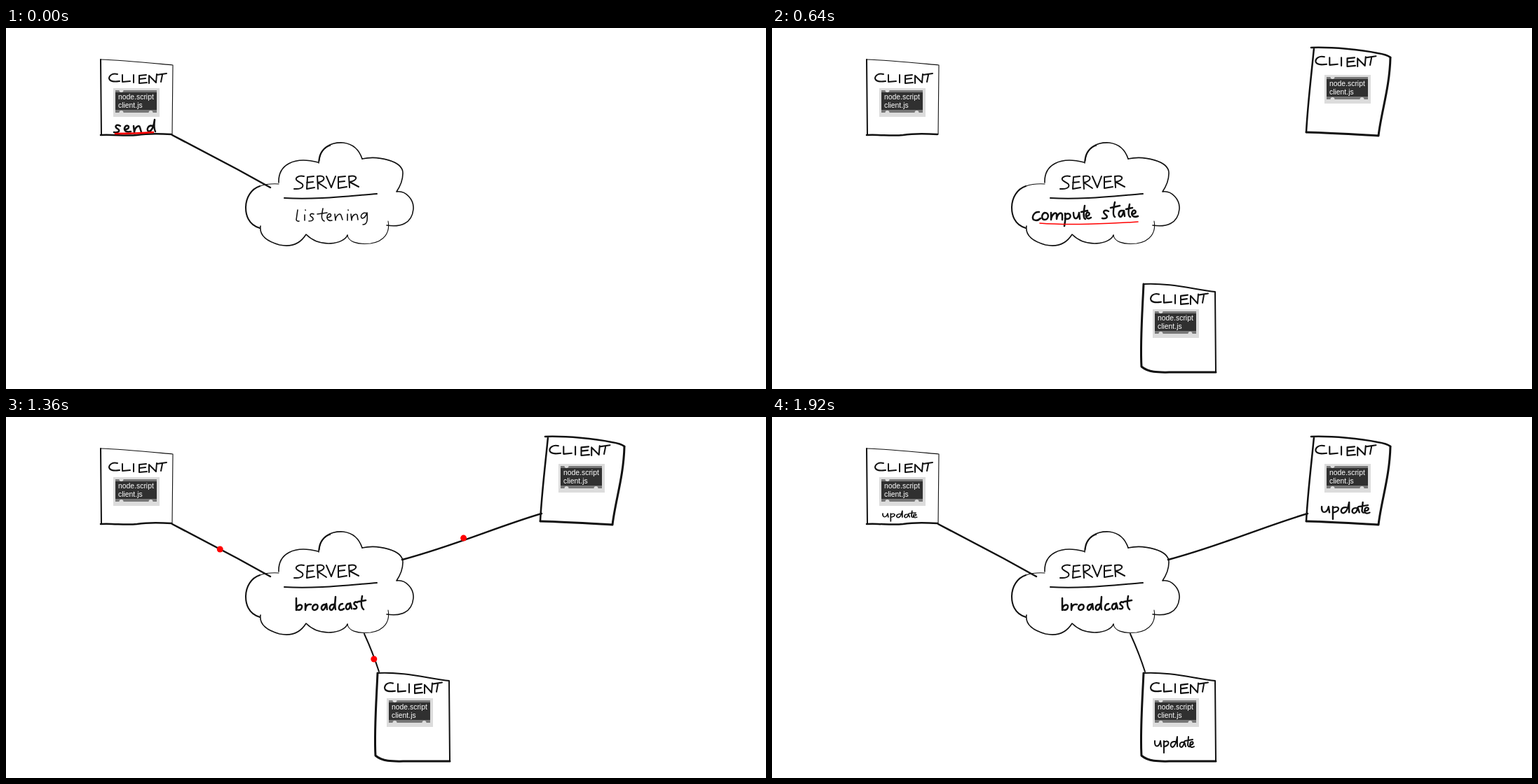
Write an HTML page that moves like this. It is 1084x516 px and loops after 2020 ms.

```html
<!DOCTYPE html>
<html lang="en">
<head>
<meta charset="utf-8">
<title>Client / server state loop</title>
<style>
  html, body { margin: 0; width: 100%; height: 100%; overflow: hidden; background: #fff; }
  svg { display: block; width: 1084px; height: 516px; }
  path { fill: none; stroke: #111; stroke-linecap: round; stroke-linejoin: round; stroke-width: 2; }
  .w1 { stroke-width: 1.1; }
  .w2 { stroke-width: 1.6; }
  .w3 { stroke-width: 2.5; }
  .w4 { stroke-width: 3; }
  .red { stroke: #f00; }
  .dot { fill: #f00; }
  text { font: 10.4px "Liberation Sans", Arial, sans-serif; fill: #fff; }
</style>
</head>
<body>
<svg viewBox="0 0 1084 516">
  <defs>
    <path id="client" aria-label="CLIENT" d="M159,66 C152,64 147,68 147,72 C148,77 154,77 162,76
      M166,67 L166,77 L177,76 M182,67 L182,78
      M190,68 L190,79 L201,78 M190,68 L200,67 M190,73 L199,72
      M204,79 L204,68 L214,78 L215,66 M215,67 L229,65 M223,67 L221,77"/>
    <g id="panel">
      <rect x="153" y="86" width="66" height="41" fill="#dcdcdc"/>
      <rect x="156" y="89" width="59" height="32" fill="#777"/>
      <rect x="156" y="92" width="59" height="25" fill="#303030"/>
      <path d="M161.500,89 a3,3 0 0 0 6,0z M161.500,121 a3,3 0 0 1 6,0z M203.500,121 a3,3 0 0 1 6,0z" style="fill:#ddd;stroke:none"/>
      <text x="160" y="102">node.script</text>
      <text x="160" y="114">client.js</text>
    </g>
    <path id="update" aria-label="update" d="M546,463 C545,473 552,473 554,463 L555,471
      M559,463 L559,480 M559,465 C566,460 569,469 560,471
      M575,464 C568,463 567,471 571,472 C575,471 577,464 578,457 L578,471
      M587,465 C581,463 580,472 584,472 C587,471 588,466 588,464 L590,471
      M594,457 L593,469 Q594,472 596,471 M589,463 L600,461
      M596,469 C603,468 601,462 597,465 C595,470 597,474 602,471"/>
    <path id="mark" class="red w4" d="M547,477 C560,480 585,478 605,478"/>
  </defs>

  <!-- first client -->
  <path class="w1" d="M135,45 C165,46 205,50 238,53 L237,152"/>
  <path d="M135,45 L136,153"/>
  <path class="w3" d="M135,153 C155,152 170,155 187,153 C205,150 222,151 236,152"/>
  <use href="#client"/>
  <use href="#panel"/>

  <!-- other clients -->
  <g data-show="8-24">
    <path class="w3" d="M769,28 C800,27 840,31 864,36 Q877,38 882,42 M773,29 C769,70 764,110 762,149"/>
    <path class="w4" d="M882,42 C881,85 869,120 865,154 C830,152 800,150 762,149"/>
    <use href="#client" transform="translate(621,-28) scale(1.05)"/>
    <use href="#panel" transform="translate(635,-19)"/>
    <path d="M530,366 C565,364 600,373 632,377 L633,492"/>
    <path class="w4" d="M530,366 C528,410 525,450 527,484 C539,494 555,492 575,492 L633,492"/>
    <use href="#client" transform="translate(393,308) scale(1,1.1)"/>
    <use href="#panel" transform="translate(390,316)"/>
  </g>

  <!-- cloud -->
  <path class="w2" d="M389,221 C388,196 410,183 445,192 M508,187 C530,182 567,190 566,208 C566,220 561,228 557,234
    C570,232 582,245 581,259 C579,280 562,285 543,282
    M487,296 C482,309 448,315 428,295 C418,311 404,313 390,310 C372,305 361,297 363,283"/>
  <path class="w2" d="M446,193 C446,170 465,163 481,164 C498,166 505,178 508,187"/>
  <path class="w1" d="M447,190 C448,178 454,171 463,168 M545,276 C548,292 540,305 520,308 C500,310 488,305 487,296 M362,226 Q374,222 389,223"/>
  <path d="M362,286 C345,281 342,266 342,257 C342,242 350,230 362,226"/>
  <path d="M397,243 C440,246 490,240 529,237"/>
  <path aria-label="SERVER" d="M425,212 C417,210 411,215 415,218 C420,222 425,222 423,227 C420,231 415,230 411,230
    M430,213 L429,230 L440,228 M430,213 L439,212 M429,221 L438,220
    M445,230 L444,212 C456,209 457,219 445,221 L457,229
    M457,212 L464,228 L470,212
    M474,213 L474,229 L486,227 M474,213 L484,212 M474,220 L483,219
    M490,228 L489,212 C502,209 503,218 490,220 L503,227"/>

  <!-- what the server is doing -->
  <path data-show="0-7" class="w2" aria-label="listening" d="M416,260 L414,274 Q415,277 418,276
    M426,267 L426,275 M427,260 l.2,.5
    M439,266 C434,264 432,268 436,270 C440,273 438,276 432,276
    M452,258 C450,268 449,274 454,276 M444,266 L458,264
    M458,271 C466,270 464,264 460,266 C456,270 458,277 465,275
    M469,266 L470,275 C470,268 477,263 478,268 L480,274
    M487,266 L487,275 M488,260 l.2,.5
    M492,266 L493,275 C493,267 500,264 501,268 L502,274
    M515,265 C508,262 504,270 508,272 C512,272 514,267 515,264 C516,275 515,281 509,281"/>
  <g data-show="8-13">
    <path class="w3" aria-label="compute state" d="M381,263 C374,262 370,270 373,274 C377,276 381,274 383,272
      M389,264 C384,266 384,274 389,274 C395,274 396,264 389,264
      M398,264 L398,274 C399,266 405,262 406,266 L406,273 C407,265 413,262 414,267 L414,274
      M418,265 C419,272 418,278 417,283 M418,267 C424,262 428,269 424,272 Q421,274 418,272
      M430,264 C430,275 436,275 438,264 L439,273
      M446,254 C444,266 444,272 447,273 M441,263 L450,261
      M448,269 C455,268 453,262 449,264 C446,269 449,275 455,271
      M480,262 C474,259 471,263 475,266 C480,270 478,273 471,272
      M489,249 C486,262 486,268 489,270 M483,257 L496,254
      M500,261 C494,260 493,269 497,270 C500,270 501,264 502,261 L503,269
      M510,252 C508,262 508,269 511,270 M505,259 L514,257
      M514,266 C521,265 519,259 515,261 C511,266 514,272 522,269"/>
    <path class="red w2" d="M382,279 C420,282 480,280 522,277"/>
  </g>
  <path data-show="14-24" class="w3" aria-label="broadcast" d="M414,259 L414,276 C414,268 423,266 422,272 C421,277 416,276 414,275
    M427,267 L427,276 C427,269 431,267 435,268
    M441,268 C436,270 436,276 440,276 C446,275 446,267 441,268
    M456,268 C450,267 448,275 452,276 C455,275 456,270 457,267 L458,275
    M468,268 C461,267 460,275 464,276 C468,275 470,265 470,257 C469,266 469,271 470,275
    M480,267 C475,267 473,275 477,276 Q480,276 482,274
    M490,267 C485,266 483,274 487,275 C490,275 491,270 491,266 L493,274
    M501,265 C497,263 495,267 498,269 C502,272 500,275 496,274
    M508,256 C506,266 506,272 510,275 M502,264 L513,262"/>
  <path data-show="14-14" class="red" d="M414,284 Q465,287 514,282"/>

  <!-- links -->
  <path data-show="0-7" class="w3" d="M237,153 L330,202 L377,228"/>
  <g data-show="14-24">
    <path class="w3" d="M237,153 L330,202 L377,228 M565,204 C640,184 700,157 764,138"/>
    <path d="M511,310 Q523,336 532,364"/>
  </g>

  <!-- what the clients are doing -->
  <g data-show="0-7">
    <path class="w3" data-show="0-7" aria-label="send" d="M163,140 C157,137 154,141 159,144 C164,147 160,150 154,149
      M170,145 C177,144 176,138 171,140 C167,144 169,150 178,148
      M182,140 L183,149 C184,141 190,138 191,142 L193,149
      M209,140 C203,138 199,146 204,148 C209,147 211,138 212,131 C211,138 211,144 213,148"/>
  </g>
  <path data-show="0-0" class="red w3" d="M156,151 Q185,151 210,149"/>
  <g>
    <use data-show="19-24" href="#update"/>
    <use data-show="19-21" href="#mark"/>
  </g>
  <g transform="translate(-317,-163) scale(.87,.65)">
    <use data-show="20-24" href="#update"/>
    <use data-show="20-22" href="#mark"/>
  </g>
  <g transform="translate(118,-358) scale(1.22,1.05)">
    <use data-show="21-24" href="#update"/>
    <use data-show="21-23" href="#mark"/>
  </g>

  <path data-show="15-15" class="red w2" d="M374,225 L386,251 M563,202 Q549,211 544,226 M510,310 L505,300"/>
  <g id="dots"></g>
</svg>
<script>
  const STEP = 80, LOOP = 2020, LAST = 24;

  // Each message runs from one point to another between two steps.
  const messages = [
    { from: [237, 153], to: [376, 227], start: 1, end: 6.56, until: 7 },
    { from: [374, 225], to: [236.500, 153], start: 15, end: 19, until: 19 },
    { from: [563.500, 202], to: [764, 137], start: 15, end: 19.500, until: 20 },
    { from: [510.500, 310], to: [532, 364], start: 15, end: 18, until: 18 },
  ];
  for (const m of messages) {
    m.dot = document.createElementNS('http://www.w3.org/2000/svg', 'circle');
    m.dot.setAttribute('class', 'dot');
    document.getElementById('dots').append(m.dot);
  }

  const timed = [...document.querySelectorAll('[data-show]')].map(node => {
    const [first, last] = node.dataset.show.split('-').map(Number);
    return { node, first, last };
  });

  const show = (node, visible) => { node.style.display = visible ? '' : 'none'; };

  function draw() {
    const step = Math.min(LAST, Math.floor(performance.now() % LOOP / STEP));
    for (const { node, first, last } of timed) show(node, step >= first && step <= last);
    for (const { from, to, start, end, until, dot } of messages) {
      show(dot, step >= start && step <= until);
      const k = Math.max(0, Math.min(1, (step - start) / (end - start)));
      dot.setAttribute('cx', from[0] + (to[0] - from[0]) * k);
      dot.setAttribute('cy', from[1] + (to[1] - from[1]) * k);
      dot.setAttribute('r', step === 15 ? 3.4 : 4.5);
    }
    requestAnimationFrame(draw);
  }
  draw();
</script>
</body>
</html>
```
